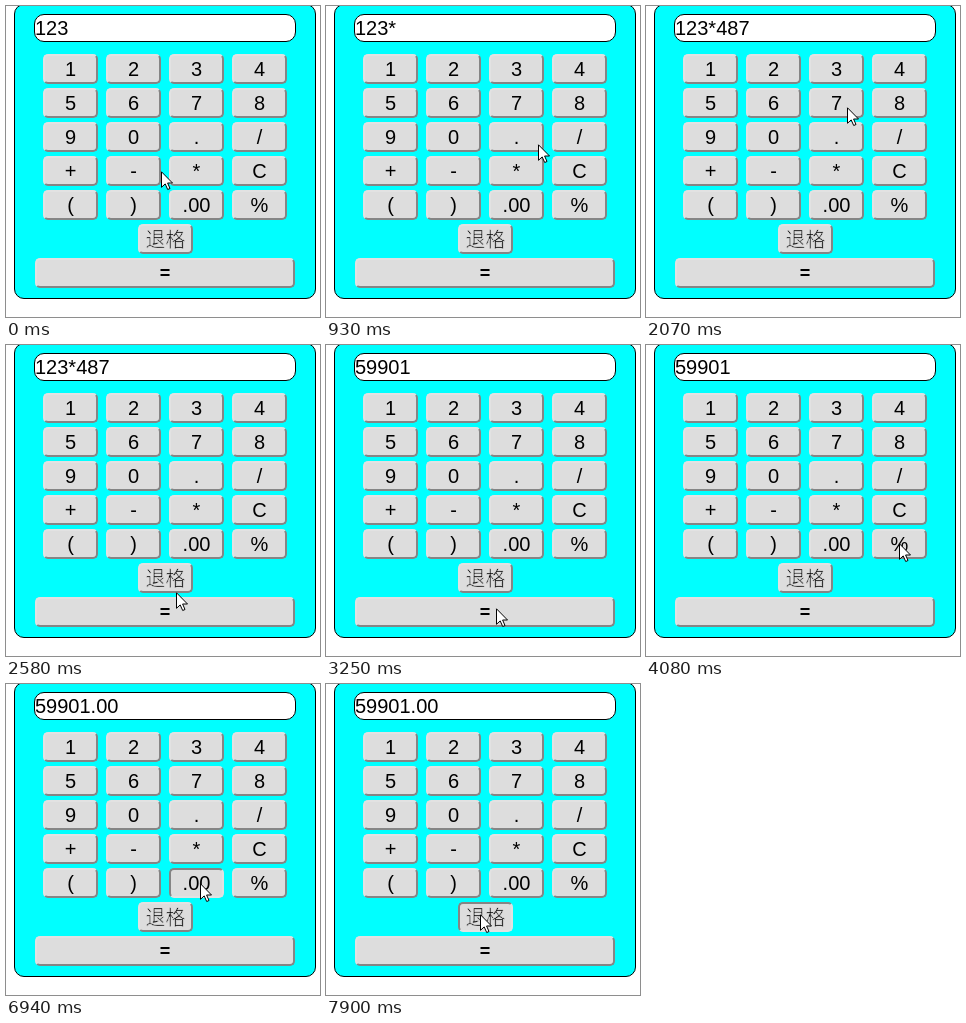
An HTML page for the animation above (8000 ms loop, 314 by 311 pixels).

```html
<!DOCTYPE html>
<html lang="zh">
<head>
<meta charset="utf-8">
<title>Calculator</title>
<style>
  * { box-sizing: border-box; }
  html, body { margin: 0; width: 100%; height: 100%; overflow: hidden; background: #fff; }
  body { position: relative; font: 20px "Liberation Sans", Arial, sans-serif; color: #000; }
  div, svg { position: absolute; }
  #panel { left: 8px; top: -2px; width: 302px; height: 295px; background: #0ff; border: 1px solid #000; border-radius: 10px; }
  #display { left: 28px; top: 8px; width: 262px; height: 28px; line-height: 26px; background: #fff; border: 1px solid #000; border-radius: 10px; white-space: pre; }
  .key { width: 55px; height: 30px; line-height: 26px; text-align: center; background: #ddd; border: 2px solid; border-color: #e2e2e2 #858585 #858585 #e2e2e2; border-radius: 5px; white-space: nowrap; }
  .key.down { border-color: #858585 #e2e2e2 #e2e2e2 #858585; }
  /* A stroke in the key colour thins the characters. */
  .back { font-family: "Noto Sans CJK SC", "Noto Sans CJK", sans-serif; font-weight: 300; -webkit-text-stroke: .7px #ddd; }
  .equals { width: 260px; font-size: 18px; font-weight: bold; }
  #cursor { left: 0; top: 0; overflow: visible; }
</style>
</head>
<body>
<div id="panel"></div>
<div id="display"></div>
<svg id="cursor" width="12" height="19">
  <path d="M.5 .8V16.3L4.2 12.9L6.7 18.5L9 17.5L6.6 12H11.5Z" fill="#fff" stroke="#000"/>
</svg>
<script>
const LOOP = 8000;
const TICK = 120;
const display = document.getElementById('display');
const cursor = document.getElementById('cursor');
const keys = {};

function addKey(label, x, y, extra = '') {
  const key = document.createElement('div');
  key.className = 'key ' + extra;
  key.textContent = label;
  key.style.left = x + 'px';
  key.style.top = y + 'px';
  document.body.insertBefore(key, cursor);
  keys[label] = key;
}

['1', '2', '3', '4', '5', '6', '7', '8', '9', '0', '.', '/', '+', '-', '*', 'C', '(', ')', '.00', '%']
  .forEach((label, i) => addKey(label, 37 + i % 4 * 63, 48 + Math.floor(i / 4) * 34));
addKey('退格', 132, 218, 'back');
addKey('=', 29, 252, 'equals');

// The pointer travels in straight lines, one step per tick.
const moves = [
  { start: 150, steps: 3, x: 170, y: 162 },
  { start: 550, steps: 1, x: 201, y: 162 },
  { start: 930, steps: 4, x: 245, y: 67 },
  { start: 1560, steps: 1, x: 251, y: 89 },
  { start: 1950, steps: 2, x: 201, y: 101 },
  { start: 2340, steps: 3, x: 170, y: 247 },
  { start: 2970, steps: 1, x: 170, y: 263 },
  { start: 3810, steps: 3, x: 253, y: 198 },
  { start: 5760, steps: 2, x: 194, y: 199 },
  { start: 7090, steps: 2, x: 154, y: 230 }
];

// A key acts when it is released; quick taps show no pressed state.
const clicks = [
  { key: '*', down: 690, up: 810 },
  { key: '4', down: 1440, up: 1560 },
  { key: '8', up: 1830 },
  { key: '7', up: 2070 },
  { key: '=', up: 3250 },
  { key: '%', up: 4640 },
  { key: '%', up: 5480 },
  { key: '.00', up: 6160 },
  { key: '.00', down: 6940, up: 7090 },
  { key: '退格', down: 7900, up: LOOP }
];

const actions = {
  '=': text => String(text.split('*').reduce((a, b) => a * b)),
  '%': text => text.endsWith('%') ? String(parseFloat(text) / 100) : (text * 100).toFixed(2) + '%',
  '.00': text => Number(text).toFixed(2),
  '退格': text => text.slice(0, -1)
};

function enter(text, key) {
  return actions[key] ? actions[key](text) : text + key;
}

function pointerAt(t) {
  let x = 155, y = 165;
  for (const move of moves) {
    if (t < move.start) break;
    const step = Math.floor((t - move.start) / TICK) + 1;
    const progress = Math.min(1, step / move.steps);
    x += (move.x - x) * progress;
    y += (move.y - y) * progress;
  }
  return `translate(${Math.round(x)}px, ${Math.round(y)}px)`;
}

function draw() {
  const t = performance.now() % LOOP;
  const held = clicks.find(click => click.down <= t && t < click.up);
  cursor.style.transform = pointerAt(t);
  display.textContent = clicks
    .filter(click => click.up <= t)
    .reduce((text, click) => enter(text, click.key), '123');
  for (const label in keys) keys[label].classList.toggle('down', label === held?.key);
  requestAnimationFrame(draw);
}
draw();
</script>
</body>
</html>
```
